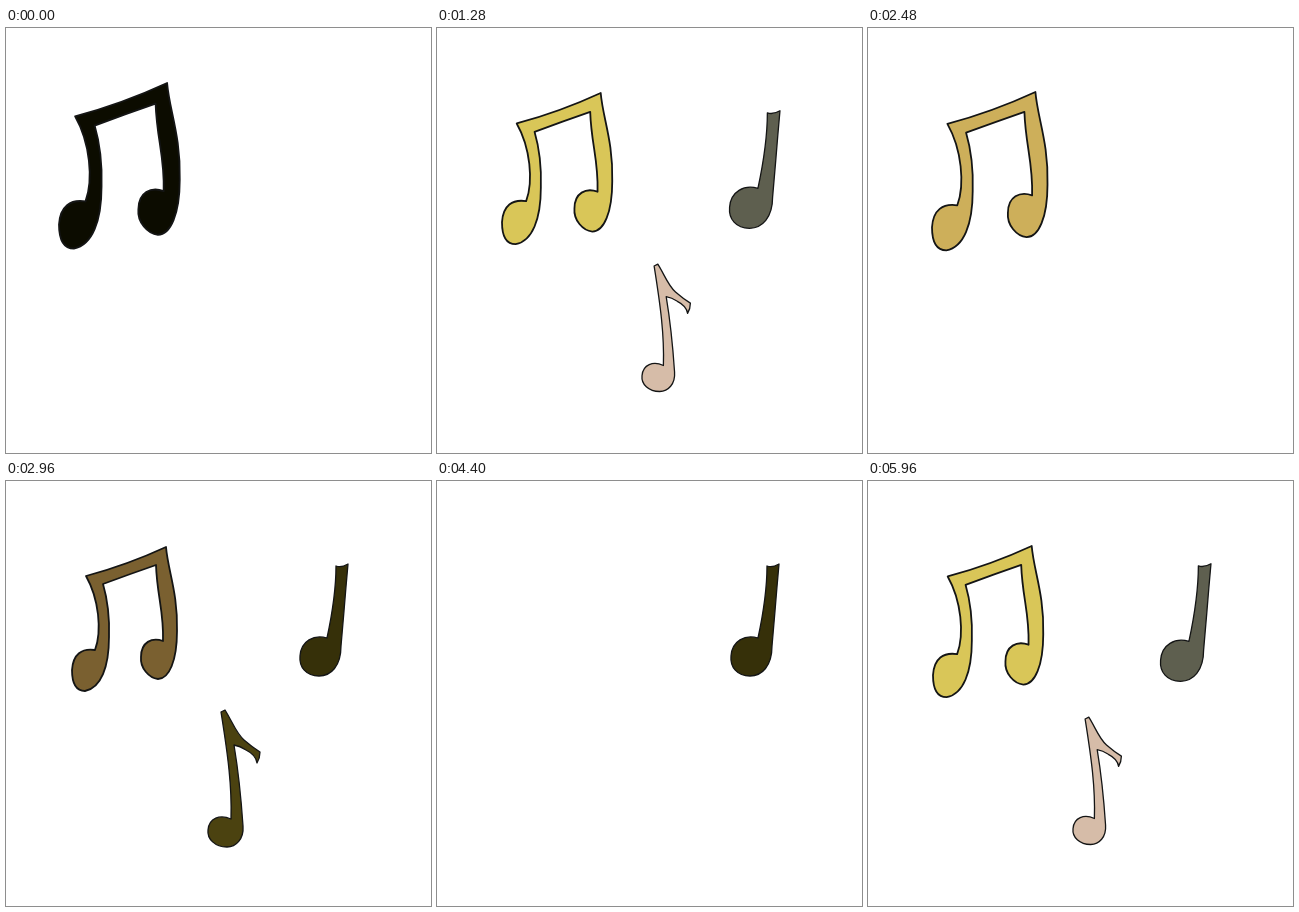
Animation, 425 px wide and 425 px high, one loop 6000 ms. Source, as an HTML page:

```html
<!DOCTYPE html>
<html lang="en">
<head>
<meta charset="utf-8">
<title>Music notes</title>
<style>
  html, body { margin: 0; width: 100%; height: 100%; overflow: hidden; background: #fff; }
  svg { display: block; width: 100%; height: 100%; }
  path { stroke: #141515; stroke-width: 1.3; stroke-linejoin: round; vector-effect: non-scaling-stroke; }
  path:first-child { stroke-width: 1.8; }
</style>
</head>
<body>
<svg viewBox="0 0 425 425">
  <path d="M80 95Q121 84 160 66C162 90 172 112 171 150C171 180 163 198 152 198C143 197 134 187 135 176C135 161 146 156 157 160C158 130 151 115 150 84Q124 93 97 103Q104 127 103 156C103 186 95 207 79 210C69 210 66 201 66 189C67 173 76 167 89 169C96 150 93 118 80 95Z"/>
  <path d="M330 85Q335 87 342 83Q340 105 338 130L335 165C335 185 325 195 313 195C300 195 293 186 294 175C295 160 308 153 321 157Q330 115 330 85Z"/>
  <path d="M215 231L219 229C226 240 230 252 238 259Q246 266 254 271Q254 277 251 282Q250 274 240 269Q234 265 228 264Q234 300 237 345C238 358 230 366 221 366C209 366 201 358 202 349C203 337 214 333 225 338C226 305 222 275 215 231Z"/>
</svg>
<script>
const STEP = 40, BEAT = 9, FRAMES = 150;
const SETTLE = 2;     // steps from the hit until a note reaches its resting size
const HIT_SIZE = 0.15;

// Notes sounding on each beat; "123" is all of them.
const score = '1 2 3 123 3 2 1 123 123 123 123 1 2 3 123 123 123'.split(' ');

// anchor: centre of scaling; kick: offset at the hit; grow, drift: change until the beat ends.
const notes = [
  { anchor: [86, 86], kick: [-10, -8], grow: 0.1, drift: [0, 0], fills: ['#7a6030', '#d9c658', '#cdaf5a'] },
  { anchor: [350, 101], kick: [0, 0], grow: 0.1, drift: [11, 5], fills: ['#363009', '#5e5f4f', '#91502c'] },
  { anchor: [245, 309], kick: [0, 6], grow: -0.14, drift: [0, 12], fills: ['#4b4210', '#d6bca8', '#c8b2a0'] }
];
const paths = document.querySelectorAll('path');

const channels = hex => [1, 3, 5].map(i => parseInt(hex.slice(i, i + 2), 16));

function blend(from, to, k) {
  const end = channels(to);
  return `rgb(${channels(from).map((v, i) => Math.round(v + (end[i] - v) * k))})`;
}

function fillAt(fills, hit, t) {
  if (hit > 0) return blend('#0c0c00', fills[0], 1 - hit);
  const i = t < 0.5 ? 0 : 1;
  return blend(fills[i], fills[i + 1], t * 2 - i);
}

function draw(now) {
  const frame = Math.floor(now / STEP) % FRAMES;
  const phase = frame % BEAT;
  const sounding = score[Math.floor(frame / BEAT)];
  const hit = Math.max(0, 1 - phase / SETTLE);
  const t = Math.max(0, (phase - SETTLE) / (BEAT - 1 - SETTLE));

  notes.forEach(({ anchor, kick, grow, drift, fills }, n) => {
    const size = 1 + HIT_SIZE * hit + grow * t;
    const [x, y] = anchor.map((a, i) => a * (1 - size) + kick[i] * hit + drift[i] * t ** 3);
    paths[n].setAttribute('transform', `translate(${x} ${y}) scale(${size})`);
    paths[n].setAttribute('fill', fillAt(fills, hit, t));
    paths[n].setAttribute('visibility', sounding.includes(n + 1) ? 'visible' : 'hidden');
  });
}

const start = performance.now();
function tick() {
  draw(performance.now() - start);
  requestAnimationFrame(tick);
}
tick();
</script>
</body>
</html>
```
